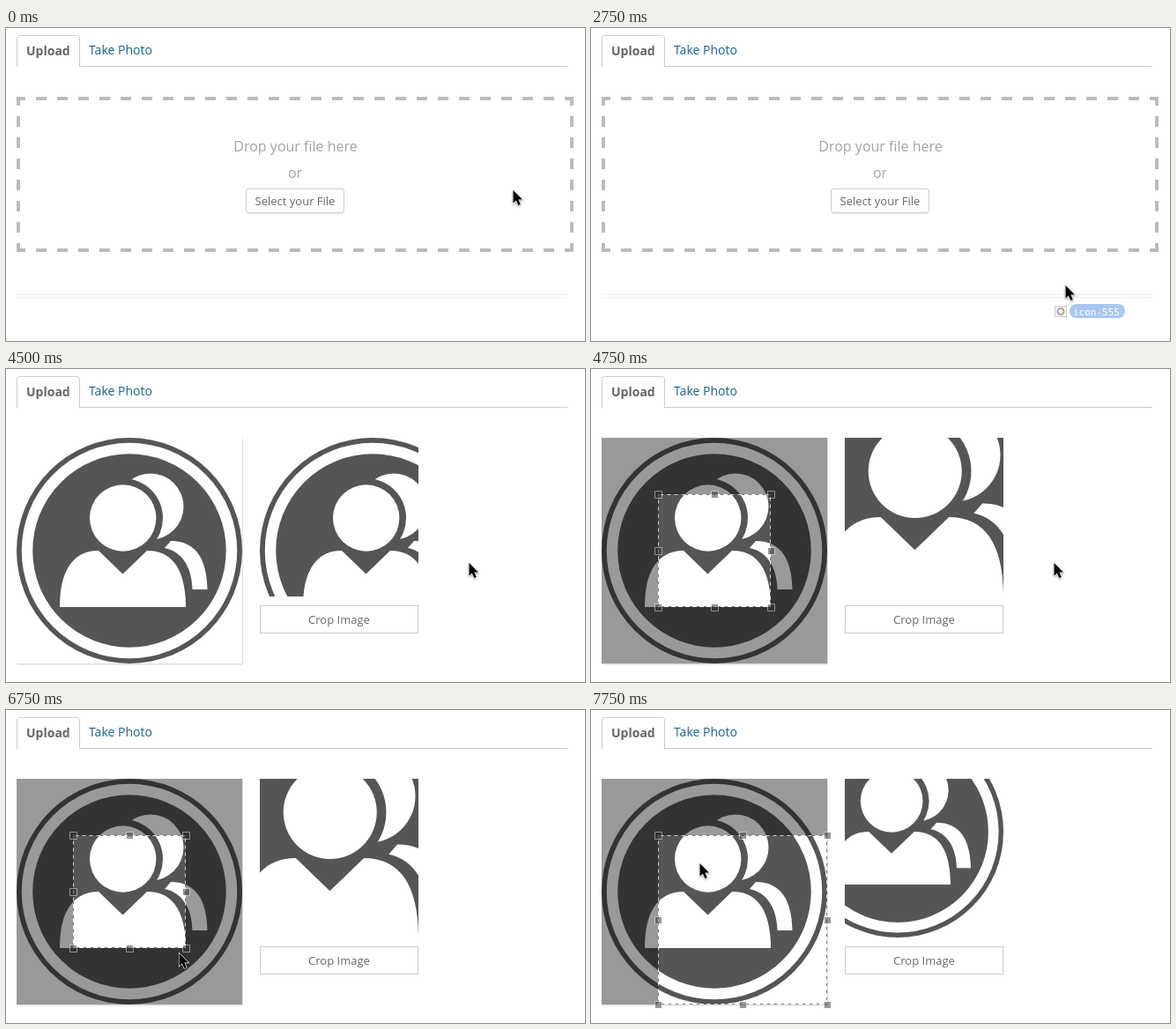
Write an HTML page that moves like this. It is 657 px wide and 355 px high and loops after 8000 ms.

```html
<!DOCTYPE html>
<html lang="en">
<head>
<meta charset="utf-8">
<title>Upload and crop</title>
<style>
  html, body { margin: 0; width: 100%; height: 100%; overflow: hidden; background: #fff; }
  svg { display: block; }
  text { font-family: "Open Sans", sans-serif; font-size: 14px; }
  .mid { text-anchor: middle; }
  .box { fill: #fff; stroke: #ccc; }
  .small { font-size: 13px; fill: #666; }
  .hint { font-size: 16px; fill: #a3a3a3; text-anchor: middle; }
</style>
</head>
<body>
<svg width="657" height="355" viewBox="0 0 657 355">
  <defs>
    <g id="icon">
      <path fill="#fff" d="M12 78h256v256H12z"/>
      <g fill="#555">
        <circle cx="140" cy="206" r="128"/>
        <circle cx="140" cy="206" r="116" stroke="#fff" stroke-width="12.5"/>
      </g>
      <g fill="#fff">
        <circle cx="164" cy="156" r="37.5"/>
        <circle cx="133" cy="169" r="45" fill="#555"/>
        <circle cx="132.7" cy="169" r="37.7"/>
        <path d="M61 270C61 229 76 206 105 206L132.5 232.5 160 206C190 206 204 229 204 270Z"/>
        <path d="M187 195C215 195 228 215 228.5 250H211.5C211 225 200 207 180 203Z"/>
      </g>
    </g>
  </defs>

  <path d="M12 43.5H637" stroke="#ccc"/>
  <path class="box" d="M12.5 44V11.5a3 3 0 0 1 3-3H80.5a3 3 0 0 1 3 3V44"/>
  <text x="23" y="31" font-weight="700" fill="#666">Upload</text>
  <text x="94" y="30" fill="#146393">Take Photo</text>

  <g id="upload">
    <path id="zone" fill="none" stroke-width="4" stroke-dasharray="12" stroke-dashoffset="2"
      d="M12 80H644M12 252H644M14 78V254M642 78V254"/>
    <text class="hint" x="328.5" y="140">Drop your file here</text>
    <text class="hint" x="328" y="170">or</text>
    <rect x="273" y="184" width="110" height="27.5" rx="3" fill="#eee"/>
    <rect class="box" x="272.5" y="182.5" width="111" height="27" rx="2.5"/>
    <text class="small mid" x="328" y="201">Select your File</text>
    <path id="rule" d="M12 302.5H637M12 305.5H637" stroke="#ededed"/>
    <g id="file">
      <text x="12" y="285" fill="#444">icon-555.jpg</text>
      <rect x="425.5" y="274.5" width="201" height="23" fill="#c3ff88" stroke="#d5d5d5"/>
    </g>
  </g>

  <g id="crop">
    <rect x="12" y="78" width="257" height="257.5" rx="2" fill="#ddd"/>
    <use id="full" href="#icon"/>
    <g id="select">
      <path d="M12 78h256v256H12z"/>
      <use href="#icon" opacity=".6"/>
      <svg id="bright"><use href="#icon"/></svg>
      <g fill="none" opacity=".7">
        <path id="antsDark" stroke="#444" stroke-dasharray="4"/>
        <path id="antsLight" stroke="#fff" stroke-dasharray="4"/>
      </g>
      <path id="handles" fill="#333" stroke="#eee" opacity=".5"/>
    </g>
    <svg id="preview" x="288" y="78" width="180" height="180"><use href="#icon"/></svg>
    <rect class="box" x="288.5" y="268.5" width="179" height="31"/>
    <text class="small mid" x="378" y="289">Crop Image</text>
  </g>

  <g id="ghost">
    <rect x="-11.5" y="23.5" width="13" height="12" fill="#f3f3f3" stroke="#ccc"/>
    <circle cx="-5" cy="29.5" r="3.5" fill="none" stroke="#aaa" stroke-width="2"/>
    <rect x="5" y="21" width="63" height="16" rx="8" fill="#a9c6f0"/>
    <text x="9" y="34" fill="#fff" style="font:11px 'DejaVu Sans Mono', monospace">icon-555</text>
  </g>
  <path id="cursor" stroke="#fff" stroke-width="1.2" paint-order="stroke"
    d="M.5 0V14.5L3.8 11.5 6.3 17 8.8 16 6.4 10.6H11Z" style="filter:drop-shadow(0 1px 1px #0006)"/>
</svg>
<script>
const LOOP = 8000, STEP = 250;
const el = id => document.getElementById(id);
const show = (id, on) => el(id).style.display = on ? "" : "none";
const set = (id, attrs) => {
  for (const k in attrs) el(id).setAttribute(k, attrs[k]);
};

// time, x, y of the pointer tip; no position means hidden
const pointer = [
  [0, 575, 184], [250], [2750, 538, 292], [3000, 519, 208], [3250, 525, 220],
  [5000, 342, 258], [5250, 234, 282], [5500, 194, 276], [6000, 195, 275],
  [6250, 196, 276], [7000, 243, 323], [7250, 274, 334], [7750, 123, 174]
];

function drawSelection(t) {
  const x = 76, y = 142, size = t < 7000 ? 128 : t < 7250 ? 175 : 192;
  const square = { x, y, width: size, height: size, viewBox: [x, y, size, size].join(" ") };
  const d = `M${x + .5} ${y + .5}h${size - 1}v${size - 1}h${1 - size}z`;
  const shift = -t / STEP * 2 % 8;
  set("bright", square);
  set("antsDark", { d, "stroke-dashoffset": shift });
  set("antsLight", { d, "stroke-dashoffset": shift + 4 });

  let grips = "";
  for (const i of [0, .5, 1])
    for (const j of [0, .5, 1])
      if (i !== .5 || j !== .5)
        grips += `M${x + Math.round(i * size) - 3.5} ${y + Math.round(j * size) - 3.5}h8v8h-8z`;
  set("handles", { d: grips });
  set("preview", { viewBox: square.viewBox });
}

function draw(t) {
  const cropping = t >= 4500, selecting = t >= 4750, uploaded = t >= 4000;
  show("upload", !cropping);
  show("crop", cropping);
  show("select", selecting);
  show("file", uploaded);
  set("zone", { stroke: t >= 3000 && t < 3750 ? "#83b4d8" : "#bbb" });
  set("rule", { transform: `translate(0 ${uploaded ? 14 : 0})` });
  if (selecting) drawSelection(t);
  else set("preview", { viewBox: "12 78 180 180" });

  const [, x, y] = pointer.findLast(p => p[0] <= t);
  const place = { transform: `translate(${x || 0} ${y || 0})` };
  show("cursor", x !== undefined);
  show("ghost", t >= 2750 && t < 3250);
  set("cursor", place);
  set("ghost", place);
}

const start = performance.now();
function tick() {
  const t = (performance.now() - start) % LOOP;
  draw(Math.floor(t / STEP) * STEP);
  requestAnimationFrame(tick);
}
tick();
</script>
</body>
</html>
```
